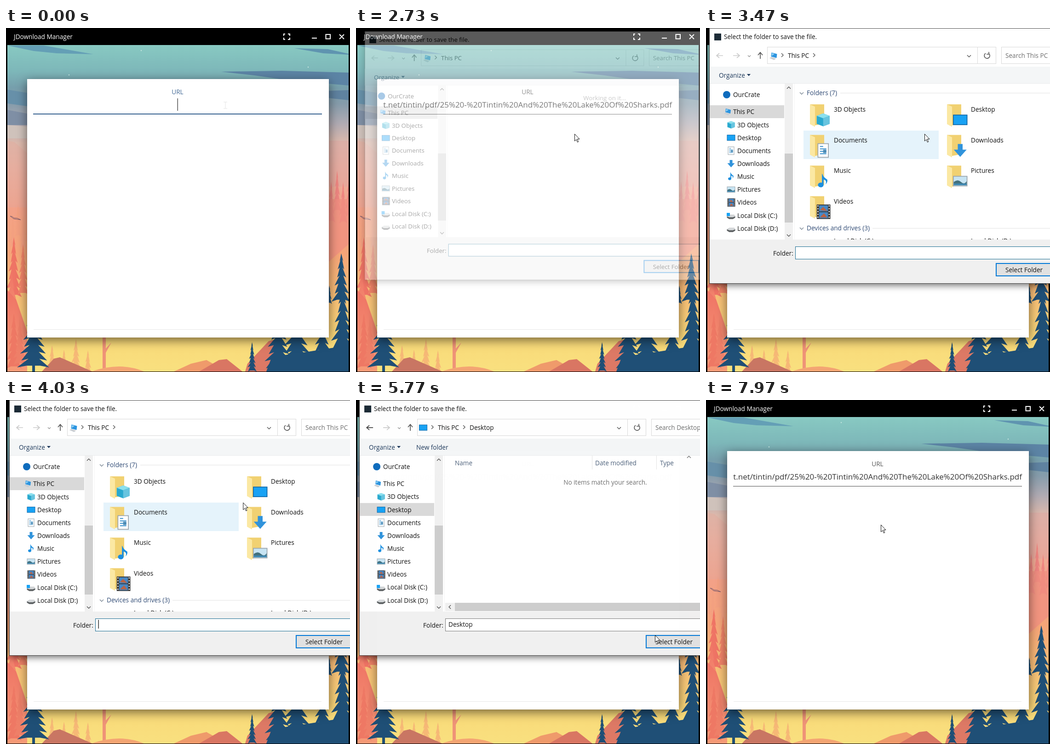
An HTML page that plays this animation: 748 px wide and 748 px high, repeating every 8000 ms.

```html
<!DOCTYPE html>
<html lang="en">
<head>
<meta charset="utf-8">
<title>Download manager</title>
<style>
html, body { margin: 0; height: 100%; overflow: hidden; background: #000; }
svg { display: block; width: 100vw; height: 100vh; font: 13.6px "Open Sans", "Noto Sans", sans-serif; }
</style>
</head>
<body>
<svg id="stage" viewBox="0 0 748 748"></svg>
<script>
const $ = id => document.getElementById(id);
const rect = (x, y, w, h, fill, more = '') =>
  `<rect x="${x}" y="${y}" width="${w}" height="${h}" fill="${fill}" ${more}/>`;
const path = (d, fill, more = '') => `<path d="${d}" fill="${fill}" ${more}/>`;
const line = (d, color, width = 1, more = '') =>
  path(d, 'none', `stroke="${color}" stroke-width="${width}" ${more}`);
const text = (s, x, y, fill = '#111', more = '') =>
  `<text x="${x}" y="${y + 5}" fill="${fill}" ${more}>${s}</text>`;
const group = (id, body, more = '') => `<g id="${id}" ${more}>${body}</g>`;
const chevron = (x, y, turn = 0, color = '#555', size = 4) =>
  line(`M${-size / 2} ${-size}L${size / 2} 0L${-size / 2} ${size}`, color, 1.4,
    `transform="translate(${x} ${y}) rotate(${turn})"`);

// Landscape
function pine(x, top, height, half, fill, tiers = 7) {
  const side = s => Array.from({ length: tiers }, (_, i) => {
    const y = top + height * (i + 1) / tiers;
    const w = s * half * (i + 1.3) / (tiers + .3) * (1 + .12 * Math.sin(i * 3 + s));
    return [`${x + w} ${y}`, `${x + w * .42} ${y - height / tiers * .25}`];
  }).flat();
  return path(`M${x} ${top}L${side(1).concat(side(-1).reverse()).join('L')}Z`, fill);
}
const row = (n, x, step, top, height, half, fill) => Array.from({ length: n }, (_, i) =>
  pine(x + i * step, top + 14 * Math.sin(i * 2.4), height, half, fill, 5)).join('');

const skyStops = [[0, '#88c9c2'], [8, '#7db7b9'], [13, '#769fac'], [18, '#869cab'], [24, '#b0abb3'],
  [30, '#dcb9ac'], [38, '#eab1a0'], [50, '#f3a188'], [64, '#f6a578'], [77, '#f8bf76'], [91, '#f9da79'], [100, '#f9e07f']];
const ink = '#1f4f76', coral = '#ef7465';
const landscape =
  `<defs><linearGradient id="sky" x2="0" y2="1">${skyStops.map(([o, c]) =>
    `<stop offset="${o}%" stop-color="${c}"/>`).join('')}</linearGradient>
  <linearGradient id="mist" x2="0" y2="1"><stop stop-color="${coral}"/><stop offset="1" stop-color="#f69b77"/></linearGradient></defs>` +
  rect(3, 37, 742, 710, 'url(#sky)') +
  path('M3 38H82L190 57L110 55L60 50Z', '#649fb6') +
  path('M627 44L700 46L745 56V58L690 55Z', '#5f94b0') +
  path('M468 95L600 93L745 97V125L610 113L540 103Z', '#5c84a5') +
  path('M690 137L745 135V157L690 151Z', '#5f82a0') +
  path('M3 134L46 141V170L3 164Z', '#6790a9') +
  path('M3 178L46 186V211H3Z', '#7f8fa5') +
  path('M3 211L46 214V240H3Z', '#cfc2bb') +
  path('M3 245L18 248L46 272V390H3Z', '#e0a89c', 'opacity=".4"') +
  path('M700 245H745V345H700Z', '#dba09d', 'opacity=".4"') +
  [[294, 49], [137, 102], [657, 85]].map(([x, y]) => `<circle cx="${x}" cy="${y}" r="1.2" fill="#c8e6e0"/>`).join('') +
  row(5, 4, 11, 398, 70, 7, '#f3a080') +
  line('M9 409Q14 409 17 413Q24 412 32 417L17 415Z', '#74566a', 1) +
  row(6, 694, 13, 324, 90, 9, '#ee8580') + path('M700 372H745V470L700 510Z', '#f18f80', 'opacity=".75"') +
  pine(17, 455, 130, 17, coral) + pine(37, 470, 110, 13, '#f18468') +
  pine(12, 525, 150, 20, 'url(#mist)') + path('M3 570L22 590L46 660V747H3Z', 'url(#mist)') +
  pine(17, 620, 120, 17, '#ee7864') + pine(30, 632, 100, 15, '#ee7f68') +
  row(4, 100, 26, 690, 65, 11, '#f6b876') +
  path('M210 673H217V747H210ZM214 700L229 684L217 706Z', '#ef9377') +
  path('M185 747Q250 725 300 747Z', '#f4a573') +
  path('M78 747L104 719L117 716L188 747Z', '#c97663') +
  path('M365 747L402 730L436 722L480 747Z', '#ef9a6b') +
  path('M420 747L463 722L480 720L514 747Z', '#d97663') +
  path('M525 730L571 681L600 673V747H520Z', '#dd7965') +
  pine(60, 588, 150, 33, ink, 10) + path('M57 700H63V747H57Z', ink) +
  pine(535, 683, 64, 10, ink) + pine(592, 600, 140, 30, ink, 9) + pine(632, 590, 150, 36, ink, 9) +
  pine(688, 630, 117, 28, ink, 8) + path('M566 747L578 715L650 705L745 690V747Z', ink) +
  pine(703, 560, 40, 6, ink, 4) + pine(729, 490, 105, 19, ink, 6) + pine(732, 560, 140, 26, ink, 7);

// Main window
const app = landscape +
  rect(46, 111, 656, 562, '#fff', 'style="filter:drop-shadow(0 6px 11px #0008)"') +
  path('M0 0H748V748H0ZM3 37V747H745V37Z', '#000', 'fill-rule="evenodd"') +
  text('JDownload Manager', 17, 19, '#fff') +
  line('M607 13H604V17M613 13H617V17M617 21V25H613M607 25H604V21M665 22H676M695.500 14H705V23.500H695.500ZM725 14L735 24M735 14L725 24', '#fff', 2) +
  text('URL', 373, 139, '#555', 'id="label" text-anchor="middle"') +
  text('t.net/tintin/pdf/25%20-%20Tintin%20And%20The%20Lake%20Of%20Sharks.pdf', 687, 168, '#333',
    'id="url" text-anchor="end" font-size="17"') +
  line('M59 187.500H687', '#4d4d4d') + line('M59 187H687', '#36618f', 2, 'id="focus"') +
  rect(372.500, 153, 1.5, 27, '#555', 'id="caret"') + rect(60, 655, 626, 1, '#e8e8e8');

// 18 px icons
const icons = {
  pc: path('M4 2L15 5L14 13L3 10Z', '#2c94df') + path('M5 3L10 5L4 9Z', '#8fd0f5') + path('M0 13L4 11L13 14L9 17Z', '#c9ced3'),
  cube: path('M1 4L9 1L17 4V14L9 17L1 14Z', '#29a9cf') + path('M1 4L9 1L17 4L9 7Z', '#8be0ee') + path('M9 7L17 4V14L9 17Z', '#67c4df'),
  desktop: rect(.5, 3, 17, 12, '#18a2f4', 'stroke="#1268a8"'),
  doc: rect(2.500, .5, 13, 17, '#fff', 'stroke="#9aa5ad"') + line('M5 4H9M5 7H13M5 10H13M5 13H13', '#4a9ad0', 1.2) + rect(9, 8, 4, 4, '#4b8bb5'),
  down: path('M6 1H12V8H17L9 17L1 8H6Z', '#3093db'),
  music: path('M8 0Q9 4 14 7Q15 10 12 13Q14 8 9.500 7V14A3.500 3 0 1 1 7.500 11V0Z', '#1c8fe0'),
  picture: rect(.5, 3, 17, 12, '#c7e4f3', 'stroke="#9aa5ad"') + path('M1 10Q6 6 10 10T17 9V14H1Z', '#43717d') + rect(1, 12, 16, 2, '#3d88b4'),
  video: rect(1, 0, 17, 18, '#353535') + rect(4, 1, 11, 7.500, '#4787c4') + rect(4, 9.500, 11, 7.500, '#4787c4') +
    path('M5 7L9 3L14 8ZM5 16L10 11L14 16Z', '#b96345') + line('M2.500 1V18M16.500 1V18', '#ddd', 1.500, 'stroke-dasharray="1.500 2"'),
  disk: path('M0 11L5 8H16L18 11V14L13 17H5L0 14Z', '#5d6163') + path('M0 11L5 8H16L18 11L13 13H5Z', '#d5d8da'),
};
const icon = (name, x, y, scale = 1) => `<g transform="translate(${x} ${y}) scale(${scale})">${icons[name]}</g>`;

const places = [['3D Objects', 'cube'], ['Desktop', 'desktop'], ['Documents', 'doc'], ['Downloads', 'down'],
  ['Music', 'music'], ['Pictures', 'picture'], ['Videos', 'video'], ['Local Disk (C:)', 'disk'], ['Local Disk (D:)', 'disk']];
const sidebar = rect(8, 168, 162, 28, '#d9d9d9', 'id="selected"') +
  '<circle cx="45" cy="145" r="8" fill="#0f6cbd"/>' + text('OurCrate', 59, 145) +
  icon('pc', 39, 173) + text('This PC', 59, 182) +
  places.map(([name, kind], i) => {
    const y = 210.500 + 28.150 * i;
    return icon(kind, 45.500, y - 9) + text(name, 68, y);
  }).join('') + rect(45, 402, 7, 7, '#18a2f4') +
  rect(171, 121, 18, 339, '#f0f0f0') + rect(171, 273, 18, 150, '#cdcdcd') +
  chevron(180, 130, -90) + chevron(180, 451, 90) + rect(192, 121, 1, 339, '#f3f3f3');

const navy = '#1e395b', slate = '#4c607a', gray = '#6d6d6d';
const middle = 'text-anchor="middle"';
const section = (name, y, end) => chevron(208, y + 1, 90, '#7a8794') + text(name, 219, y, '#2f4a74') + rect(end, y, 480, 1, '#e2e2e2');
const folders = rect(212, 223, 294, 62, '#e5f3ff', 'id="hover"') + section('Folders (7)', 141, 292) +
  places.slice(0, 7).map(([name, kind], i) => {
    const x = 226 + 298 * (i % 2), y = 165 + 66.600 * (i >> 1);
    return path(`M${x} ${y + 1}H${x + 31}V${y + 43}L${x + 9} ${y + 47}Z`, '#f1d172') +
      path(`M${x} ${y + 1}L${x + 11} ${y + 6}V${y + 50}L${x} ${y + 44}Z`, '#fbe8a3') +
      icon(kind, x + 13, y + 19, 1.750) + text(name, x + 52, y + 12);
  }).join('') + section('Devices and drives (3)', 435, 362) +
  text('Local Disk (C:)', 278, 463) + text('Local Disk (D:)', 576, 463);
const desktopView = text('Name', 215, 137, slate) + text('Date modified', 520, 137, slate) + text('Type', 661, 137, slate) +
  rect(513, 121, 1, 30, '#e2e2e2') + rect(653, 121, 1, 30, '#e2e2e2') + chevron(724, 124, -90, '#777') +
  text('No items match your search.', 542, 179, gray, middle) +
  rect(194, 441, 700, 18, '#f0f0f0') + rect(215, 441, 660, 18, '#cdcdcd') + chevron(204, 450, 180);

const arrow = (x, turn, color, id) => line('M-7 0H7M1 -5L7 0L1 5', color, 1.700, `id="${id}" transform="translate(${x} 60) rotate(${turn})"`);
const dialog = rect(7.500, .5, 890, 555, '#fff', 'stroke="#444" style="filter:drop-shadow(0 3px 8px #0009)"') +
  rect(18, 12, 15, 15, '#1c2b36') + text('Select the folder to save the file.', 39, 19) +
  arrow(30, 180, '#ccc', 'back') + arrow(66, 0, '#ccc', 'forward') + chevron(94, 61, 90, '#999', 3) + arrow(118, -90, '#555', 'up') +
  rect(133.500, 41.500, 497, 36, '#fff', 'stroke="#d9d9d9"') + rect(590, 42, 1, 36, '#d9d9d9') +
  rect(642.500, 41.500, 246, 36, '#fff', 'stroke="#d9d9d9"') +
  chevron(572, 61, 90) + line('M615 55.500A6 6 0 1 1 608 55M615 52V57H610', '#555', 1.600) +
  chevron(166, 59) + text('This PC', 178, 60) +
  group('atPc', icon('pc', 138, 51, 1.100) + text('Search This PC', 651, 60, gray)) +
  group('crumbEnd', chevron(235, 59)) +
  group('atDesktop', icon('desktop', 137, 51) + text('Desktop', 247, 60) + text('Search Desktop', 651, 60, gray)) +
  rect(8, 84, 889, 37, '#f4f6f7') + rect(8, 120, 889, 1, '#e9ebec') +
  text('Organize', 28, 103, navy) + path('M89 100H97L93 104.500Z', navy) + text('New folder', 131, 103, navy, 'id="newFolder"') +
  sidebar +
  text('Working on it...', 543, 149, gray, `id="working" ${middle}`) +
  group('folders', folders) + group('desktopView', desktopView) +
  rect(8, 460, 889, 95, '#f0f0f0') + text('Folder:', 146, 490) +
  rect(194.500, 475.500, 694, 27, '#fff', 'id="field" stroke="#7a7a7a"') + text('Desktop', 201, 488, '#111', 'id="choice"') +
  rect(200.500, 478, 1.300, 19, '#111', 'id="fieldCaret"') +
  rect(631, 512, 122, 27, '#e1e1e1', 'id="button" stroke="#0078d7" stroke-width="2"') + text('Select Folder', 651, 526);

const cursors =
  group('beam', line('M-4 -7H4M0 -7V7M-4 7H4', '#e4e4e4')) +
  group('busy', '<circle r="7.500" fill="#d9effa" stroke="#2b9cdb" stroke-width="4.500"/>' +
    line('M-7.500 0A7.500 7.500 0 0 1 -3 -6.900', '#6cc4ee', 4.500)) +
  group('pointer', path('M.5 .5V16L4 12.500L6.500 18.300L8.700 17.300L6.300 11.500H11Z', '#fff', 'stroke="#111"'));

$('stage').innerHTML = app + group('dialog', dialog) + group('cursor', cursors);

// Motion
const between = (t, a, b) => t >= a && t < b;
const progress = (t, a, b) => Math.min(1, Math.max(0, (t - a) / (b - a)));
const show = (id, on) => { $(id).style.display = on ? '' : 'none'; };
const track = [[0, 477, 168], [1269, 477, 168], [1270, 475, 167], [1999, 475, 167], [2000, 474, 174], [2030, 474, 174],
  [2450, 475, 236], [2699, 475, 236], [2700, 475, 230], [3530, 475, 230], [4030, 515, 223], [4270, 585, 188],
  [4630, 585, 188], [4930, 582, 270], [5400, 650, 511], [5940, 650, 511], [6270, 277, 310], [6500, 277, 267],
  [7570, 277, 267], [7700, 300, 316], [7850, 386, 300], [7970, 380, 271], [8000, 380, 271]];

function cursorAt(t) {
  const i = track.findIndex(key => key[0] > t);
  const [t0, x0, y0] = track[i - 1], [t1, x1, y1] = track[i], k = (t - t0) / (t1 - t0);
  return [x0 + (x1 - x0) * k, y0 + (y1 - y0) * k];
}

function draw(t) {
  const blur = progress(t, 2030, 2380), mix = (a, b) => Math.round(a + (b - a) * blur);
  $('label').setAttribute('fill', `rgb(${mix(66, 85)},${mix(105, 85)},${mix(150, 85)})`);
  $('focus').style.opacity = 1 - blur;
  show('url', t >= 600);
  show('caret', t < 70 || between(t, 600, 1100));
  $('caret').setAttribute('x', t < 600 ? 372.500 : 685);

  const opening = 1 - (1 - progress(t, 2700, 2930)) ** 3, closing = progress(t, 5770, 5940);
  const shown = opening * (1 - .96 * closing), scale = 1 - .04 * (1 - opening) - .04 * closing;
  show('dialog', between(t, 2700, 5960));
  $('dialog').style.opacity = shown;
  $('dialog').setAttribute('transform', `translate(452 260) scale(${scale}) translate(-452 -260)`);

  const chosen = t >= 4370, inside = t >= 4640, loaded = t >= 3250;
  show('working', !loaded);
  show('folders', loaded && !inside);
  show('crumbEnd', loaded && !inside);
  show('atPc', !inside);
  for (const id of ['desktopView', 'atDesktop', 'newFolder']) show(id, inside);
  if (inside) show('crumbEnd', true);
  show('choice', chosen);
  show('fieldCaret', !chosen && (t + 330) % 1060 < 530);
  $('field').setAttribute('stroke', chosen ? '#7a7a7a' : '#1b6d93');
  $('back').setAttribute('stroke', inside ? '#444' : '#ccc');
  $('selected').setAttribute('y', inside ? 224 : 168);
  $('button').setAttribute('fill', between(t, 5380, 5770) ? '#e5f1fb' : '#e1e1e1');
  const onDesktop = t >= 4060;
  $('hover').setAttribute('x', onDesktop ? 510 : 212);
  $('hover').setAttribute('y', onDesktop ? 157 : 223);
  $('hover').setAttribute('fill', chosen ? '#cce8ff' : '#e5f3fb');

  $('cursor').setAttribute('transform', `translate(${cursorAt(t)})`);
  show('beam', t < 1270);
  show('busy', between(t, 1270, 2700));
  show('pointer', t >= 2700);
  $('busy').setAttribute('transform', `rotate(${progress(t, 2030, 2470) * 240})`);
}

function tick() {
  draw(performance.now() % 8000);
  requestAnimationFrame(tick);
}
tick();
</script>
</body>
</html>
```
